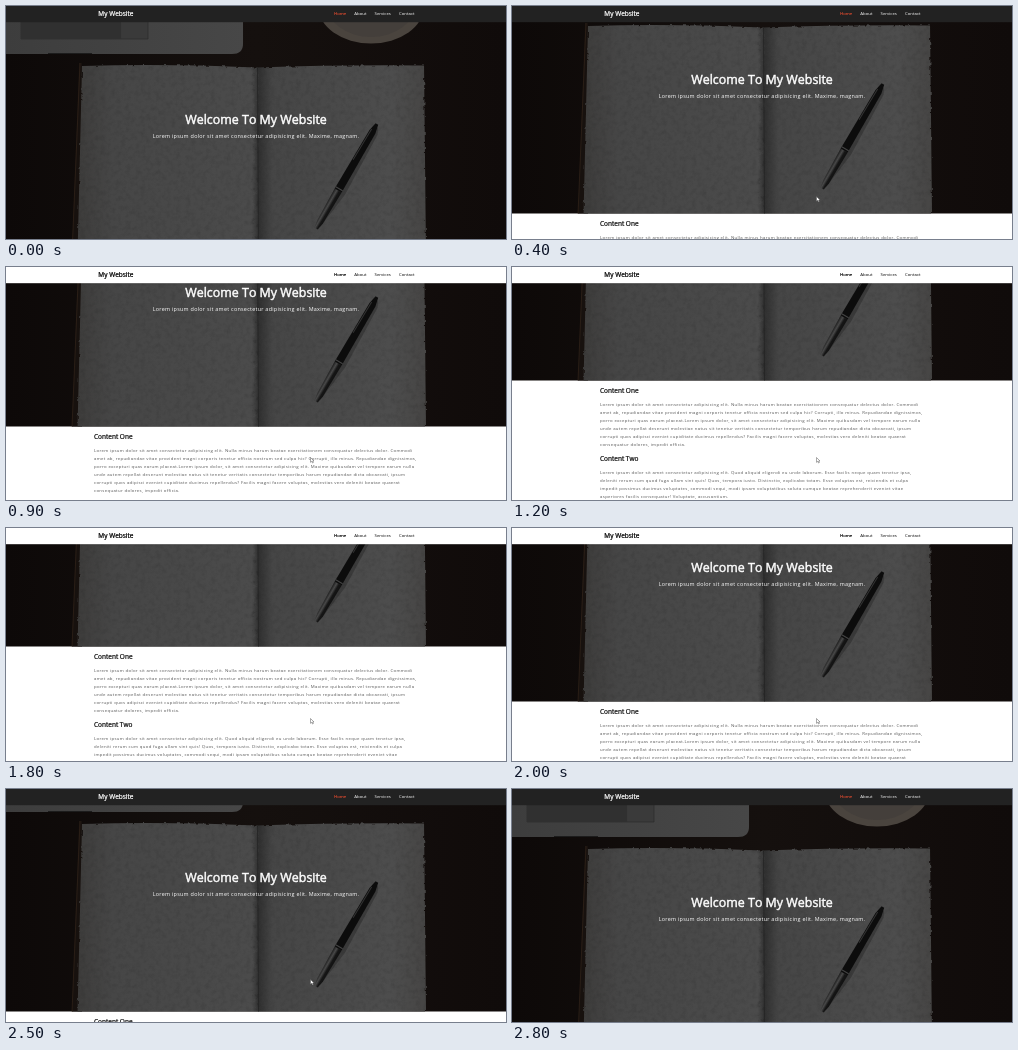
These frames come from a looping animation (500 px wide and 233 px high, 3200 ms). An HTML page:

```html
<!DOCTYPE html>
<html lang="en">
<head>
<meta charset="utf-8">
<title>My Website</title>
<style>
  * { margin: 0; padding: 0; box-sizing: border-box; }
  html, body { width: 100%; height: 100%; overflow: hidden; background: #fff; }
  body { position: relative; font: 16px "Open Sans", sans-serif; }
  /* The page is laid out at 1852px wide and shown at 27%. */
  #page, nav {
    position: absolute; top: 0; left: 0; width: 1852px;
    transform-origin: 0 0; transform: scale(.27); white-space: nowrap;
  }
  nav {
    height: 60px; padding: 0 339px 0 342px; line-height: 52px;
    display: flex; justify-content: space-between;
  }
  nav h1 { padding-top: 2px; }
  nav span + span { margin-left: 30px; }
  h1, h2, h3, b { font-weight: 400; font-kerning: none; -webkit-text-stroke: .038em; }
  h1, h3 { font-size: 24px; }
  .hero { position: relative; height: 917px; color: #fff; text-align: center; }
  .hero svg { position: absolute; left: 0; top: 0; width: 1852px; height: 917px; }
  .hero h2, .hero p { position: absolute; width: 100%; }
  .hero h2 { top: 389px; font-size: 46px; line-height: 60px; }
  .hero p { top: 466px; font-size: 20px; line-height: 30px; letter-spacing: 1px; }
  main { width: 1200px; margin: 0 auto; }
  main h3 { margin: 20px 0; line-height: 32px; color: #111; }
  main p { color: #555; line-height: 30px; letter-spacing: 1.2px; }
  #cursor { position: absolute; left: 304px; top: 190px; width: 5px; height: 7px; }
</style>
</head>
<body>
<div id="page">
  <div class="hero">
    <svg viewBox="0 0 500 247.6" preserveAspectRatio="none">
      <defs>
        <filter id="paper" x="-5%" y="-5%" width="110%" height="110%" color-interpolation-filters="sRGB">
          <feTurbulence type="fractalNoise" baseFrequency=".2" numOctaves="3" seed="4" result="noise"/>
          <feDisplacementMap in="SourceGraphic" in2="noise" scale="3" xChannelSelector="R" yChannelSelector="G" result="shape"/>
          <feColorMatrix in="noise" values="0 0 0 0 0  0 0 0 0 0  0 0 0 0 0  .2 0 0 0 -.08"/>
          <feComposite in2="shape" operator="atop"/>
        </filter>
        <linearGradient id="pages">
          <stop offset="0" stop-color="#3d3c3b"/>
          <stop offset=".1" stop-color="#464646"/>
          <stop offset=".5" stop-color="#4b4b4b"/>
          <stop offset=".52" stop-color="#303030"/>
          <stop offset=".56" stop-color="#464646"/>
          <stop offset=".9" stop-color="#4d4d4d"/>
          <stop offset="1" stop-color="#464544"/>
        </linearGradient>
        <linearGradient id="wood">
          <stop offset="0" stop-color="#0d0908"/>
          <stop offset=".5" stop-color="#15100e"/>
          <stop offset="1" stop-color="#100b0a"/>
        </linearGradient>
        <linearGradient id="laptop">
          <stop offset="0" stop-color="#3d3d3d"/>
          <stop offset="1" stop-color="#474747"/>
        </linearGradient>
        <linearGradient id="metal" x2="0" y2="1">
          <stop offset="0" stop-color="#1b1b1b"/>
          <stop offset=".35" stop-color="#484848"/>
          <stop offset=".65" stop-color="#161616"/>
          <stop offset="1" stop-color="#111"/>
        </linearGradient>
      </defs>
      <rect width="500" height="248" fill="url(#wood)"/>
      <path d="M0 0H237V38Q237 48 226 48H0Z" fill="url(#laptop)"/>
      <path d="M42 47.500H86" stroke="#1c1c1c"/>
      <path d="M15 0V33H142V0" fill="#3a3a3a" stroke="#2c2c2c" stroke-width=".7"/>
      <path d="M15 0V33H115V0" fill="#303030"/>
      <ellipse cx="365" cy="0" rx="53" ry="37.500" fill="#4a443e"/>
      <ellipse cx="365" cy="-3" rx="45" ry="34" fill="#443f3b"/>
      <path d="M73 57L66 248H76V57Z" fill="#17110e"/>
      <path d="M74 57L66 248" stroke="#33241b" stroke-width=".7"/>
      <path d="M76 60Q160 57.500 250 61.500Q340 58.500 418 59.500L420 250H71.500Z" fill="url(#pages)" filter="url(#paper)"/>
      <path d="M251.500 62L252.500 248" stroke="#242424" stroke-width=".8"/>
      <g transform="translate(310 222.500) rotate(-59.800)">
        <path d="M4 3L44 8L112 6L118 3V0H4Z" fill="#222" opacity=".4"/>
        <path d="M0 -1.800L8 -3L44 -4V4L8 3.500L0 2Z" fill="url(#metal)"/>
        <path d="M44 -4L112 -3.300L121 -1.500V1.500L112 3.500L44 4Z" fill="#0c0c0c"/>
        <path d="M46 -4V4" stroke="#444"/>
        <path d="M78 -2.500L114 -2" stroke="#333"/>
      </g>
    </svg>
    <h2>Welcome To My Website</h2>
    <p>Lorem ipsum dolor sit amet consectetur adipisicing elit. Maxime, magnam.</p>
  </div>
  <main>
    <h3>Content One</h3>
    <p>Lorem ipsum dolor sit amet consectetur adipisicing elit. Nulla minus harum beatae exercitationem consequatur delectus dolor. Commodi<br>
    amet ab, repudiandae vitae provident magni corporis tenetur officia nostrum sed culpa hic? Corrupti, illo minus. Repudiandae dignissimos,<br>
    porro excepturi quas earum placeat.Lorem ipsum dolor, sit amet consectetur adipisicing elit. Maxime quibusdam vel tempore earum nulla<br>
    unde autem repellat deserunt molestiae natus sit tenetur veritatis consectetur temporibus harum repudiandae dicta obcaecati, ipsum<br>
    corrupti quos adipisci eveniet cupiditate ducimus repellendus? Facilis magni facere voluptas, molestias vero deleniti beatae quaerat<br>
    consequatur dolores, impedit officia.</p>
    <h3>Content Two</h3>
    <p>Lorem ipsum dolor sit amet consectetur adipisicing elit. Quod aliquid eligendi eu unde laborum. Esse facilis neque quam tenetur ipsa,<br>
    deleniti rerum cum quod fuga ullam sint quis! Quos, tempora iusto. Distinctio, explicabo totam. Esse voluptas est, reiciendis et culpa<br>
    impedit possimus ducimus voluptates, commodi sequi, modi ipsam voluptatibus soluta cumque beatae reprehenderit eveniet vitae<br>
    asperiores facilis consequatur! Voluptate, accusantium.</p>
  </main>
</div>
<nav id="nav">
  <h1>My Website</h1>
  <div><span><b id="home">Home</b></span><span>About</span><span>Services</span><span>Contact</span></div>
</nav>
<svg id="cursor" viewBox="0 0 5 7"><path d="M.5 .5V5.300L1.700 4.300L2.500 6L3.300 5.600L2.600 4H4Z" fill="#fff" stroke="#555" stroke-width=".5"/></svg>
<script>
  const LOOP = 3200, STEP = 100;
  // Scroll offset at each step, for the way down and the way back.
  const DOWN = [0, 7, 26, 40, 54, 70, 79, 82, 88, 105, 124, 134];
  const UP = [134, 129, 104, 74, 58, 54, 48.6, 35, 25, 13, 4, 0];
  const [page, nav, home, cursor] = ["page", "nav", "home", "cursor"].map(id => document.getElementById(id));

  const clamp = (x, lo, hi) => Math.min(hi, Math.max(lo, x));
  const at = (list, start, t) => list[clamp((t - start) / STEP, 0, list.length - 1)];
  const ease = x => { x = clamp(x, 0, 1); return x * x * (3 - 2 * x); };
  const blend = (a, b, k) => `rgb(${a.map((v, i) => Math.round(v + (b[i] - v) * k))})`;

  function draw(now) {
    const t = Math.floor(now % LOOP / STEP) * STEP;
    const scroll = t < 1700 ? at(DOWN, 100, t) : at(UP, 1700, t);
    const light = ease((t - 610) / 290) - ease((t - 2010) / 290);

    page.style.transform = `translateY(${-scroll}px) scale(.27)`;
    nav.style.background = blend([34, 34, 34], [255, 255, 255], light);
    nav.style.color = blend([255, 255, 255], [0, 0, 0], light);
    nav.style.boxShadow = `0 2px 10px rgba(0,0,0,${.3 * light})`;
    home.style.color = blend([201, 70, 46], [0, 0, 0], light);
    cursor.style.display = scroll ? "" : "none";
    requestAnimationFrame(draw);
  }
  draw(performance.now());
</script>
</body>
</html>
```
